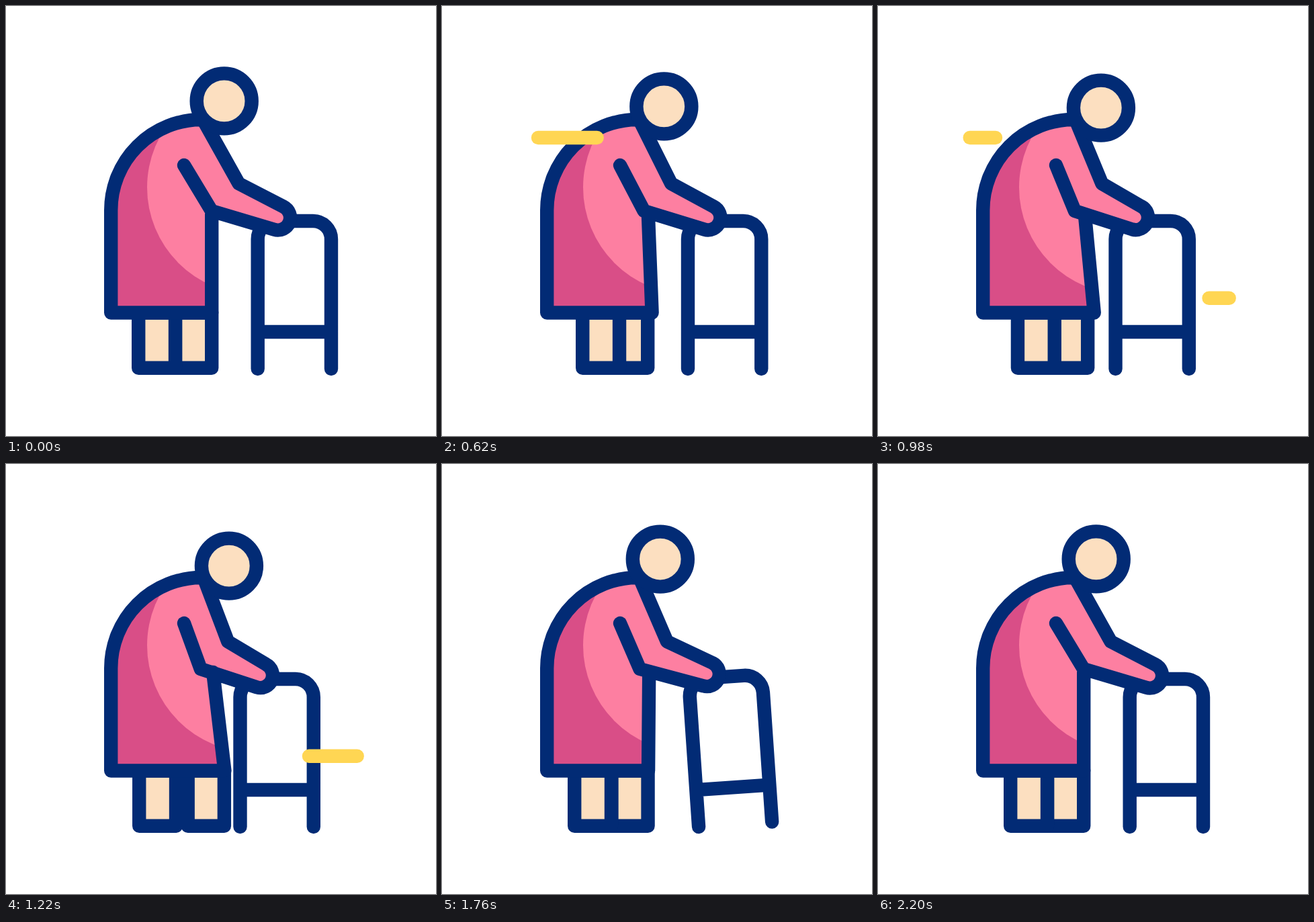
These frames come from a looping animation (640 by 640 pixels, 2.4 s). An HTML page:

```html
<!DOCTYPE html>
<html lang="en">
<head>
<meta charset="utf-8">
<title>Walking with a frame</title>
<style>
  html, body { margin: 0; width: 100%; height: 100%; overflow: hidden; background: #fff; }
  svg { display: block; width: 100vw; height: 100vh; }
  .line { fill: none; stroke: #022b75; stroke-width: 20.4; stroke-linecap: round; stroke-linejoin: round; }
  .skin { fill: #fcdfc0; }
  .dash { fill: none; stroke: #ffd653; stroke-width: 20.4; stroke-linecap: round; }
</style>
</head>
<body>
<svg viewBox="0 0 640 640">
  <defs><clipPath id="bodyClip"><path id="clipShape"/></clipPath></defs>
  <path id="walker" class="line" d="M374.7 540V347a27 27 0 0 1 27-27H457a27 27 0 0 1 27 27V540M374.7 485H484"/>
  <path id="frontLeg" class="line skin" d="M252 456.5H306.2V538.7H252Z"/>
  <path id="backLeg" class="line skin" d="M197.2 456.5H252V538.7H197.2Z"/>
  <path id="body" fill="#d94e87"/>
  <circle cx="369" cy="270" r="159" fill="#fd7fa1" clip-path="url(#bodyClip)"/>
  <path id="outline" class="line"/>
  <circle id="head" class="line skin" cx="324.7" cy="141.4" r="41"/>
  <path id="backDash" class="dash"/>
  <path id="frontDash" class="dash"/>
</svg>
<script>
const LOOP = 2400;
const el = Object.fromEntries([...document.querySelectorAll('[id]')].map(e => [e.id, e]));
// Fills set here so they win over the shared line style.
for (const id of ['frontLeg', 'backLeg', 'head']) el[id].style.fill = '#fcdfc0';

const smooth = u => u * u * (3 - 2 * u);

// Eased value at t through [time, value] keys.
function tween(t, ...keys) {
  if (t <= keys[0][0]) return keys[0][1];
  for (let i = 1; i < keys.length; i++) {
    const [t0, a] = keys[i - 1], [t1, b] = keys[i];
    if (t < t1) return a + (b - a) * smooth((t - t0) / (t1 - t0));
  }
  return keys[keys.length - 1][1];
}

// One stride: lean at 1300, lift at 1800, rest at 2200.
const stride = (t, lean, lift) => tween(t, [200, 0], [1300, lean], [1800, lift], [2200, 0]);

const shift = (node, x, y = 0) => node.setAttribute('transform', `translate(${x} ${y})`);

// A dash grows from one end, then its tail catches up.
function drawDash(node, t, start, from, to, y) {
  const mid = start + 500, end = mid + 500;
  const head = tween(t, [start, from], [mid, to]);
  const tail = tween(t, [mid, from], [end, to]);
  node.style.display = t > start && t < end ? '' : 'none';
  node.setAttribute('d', `M${tail} ${y}L${head} ${y}`);
}

function drawBody(t) {
  const elbow = stride(t, -16.5, -11.5);
  const hx = stride(t, -26.5, -10), hy = stride(t, -0.5, -2.5);
  const seamTop = `${306.2 + stride(t, 2, 2)} 310`;
  const hem = 306.2 + stride(t, 19.5, 0.5);
  const dress = `M${seamTop}L${hem} 456.5H156.2V304A135 135 0 0 1 291 169L296 174`;
  const arm = `L${346.5 + elbow} 264.3L${413 + hx} ${298.6 + hy}` +
    `A18.5 18.5 0 0 1 ${399.3 + hx} ${332.8 + hy}`;
  el.outline.setAttribute('d', `${dress}${arm}L${306 + elbow} 305L265 237`);
  el.body.setAttribute('d', `${dress}${arm}Z`);
  el.clipShape.setAttribute('d', `${dress}${arm}Z`);
}

function render(t) {
  const nod = tween(t, [200, 0], [800, 1], [1300, 1], [1800, 0]);
  shift(el.head, 7.2 * nod, 10.2 * nod);
  shift(el.backLeg, tween(t, [200, 0], [800, 15.3], [1300, 0]));
  shift(el.frontLeg, tween(t, [800, 0], [1300, 20], [1800, 0]));
  el.walker.setAttribute('transform',
    `translate(${stride(t, -26.6, 8)} 0) rotate(${tween(t, [1300, 0], [1800, -4], [2200, 0])} 374.7 540)`);
  drawBody(t);
  drawDash(el.backDash, t, 200, 230.7, 136.7, 196);
  drawDash(el.frontDash, t, 760, 522.7, 449.7, 434.7);
}

const origin = performance.now();
function frame() {
  render((performance.now() - origin) % LOOP);
  requestAnimationFrame(frame);
}
frame();
</script>
</body>
</html>
```
